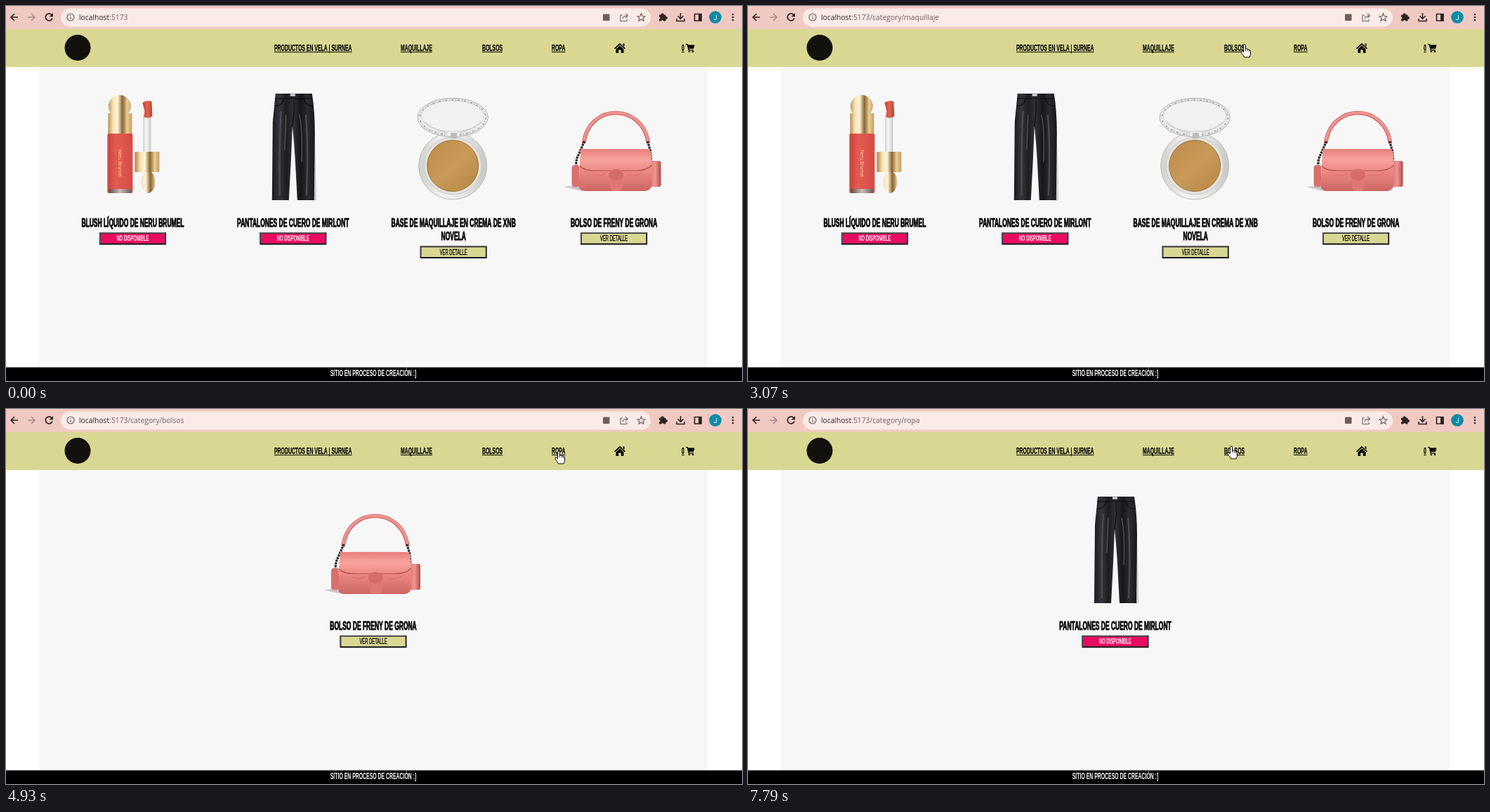
Recreate the animation shown at these times as an HTML page with a canvas. Size 1048x535 px, loop 8000 ms.

```html
<!DOCTYPE html>
<html lang="es">
<head>
<meta charset="utf-8">
<title>Tienda</title>
<style>
html, body { margin: 0; width: 100%; height: 100%; overflow: hidden; background: #fff; }
canvas { display: block; }
</style>
</head>
<body>
<canvas id="stage" width="1048" height="535"></canvas>
<script>
const ctx = document.getElementById('stage').getContext('2d');
const LOOP = 8000;
const CONDENSED = 0.53;
const OLIVE = '#d9d892', PINK = '#e90b60';
const HEADLINE = '"Liberation Sans", Arial, sans-serif';

// Drawing helpers
function rect(x, y, w, h, fill, r = 0) {
  ctx.fillStyle = fill;
  ctx.beginPath();
  ctx.roundRect(x, y, w, h, r);
  ctx.fill();
}

function oval(x, y, rx, ry, fill, stroke, width = 1) {
  ctx.beginPath();
  ctx.ellipse(x, y, rx, ry, 0, 0, Math.PI * 2);
  if (fill) { ctx.fillStyle = fill; ctx.fill(); }
  if (stroke) { ctx.strokeStyle = stroke; ctx.lineWidth = width; ctx.stroke(); }
}

function fillPath(d, fill) {
  ctx.fillStyle = fill;
  ctx.fill(new Path2D(d));
}

function line(d, stroke, width = 1) {
  ctx.strokeStyle = stroke;
  ctx.lineWidth = width;
  ctx.stroke(new Path2D(d));
}

function at(x, y, draw) {
  ctx.save();
  ctx.translate(x, y);
  draw();
  ctx.restore();
}

function gradient(x0, y0, x1, y1, ...colors) {
  const g = ctx.createLinearGradient(x0, y0, x1, y1);
  colors.forEach((c, i) => g.addColorStop(i / (colors.length - 1), c));
  return g;
}

function headline(text, x, y, size, { color = '#000', weight = 'bold', align = 'center', heavy = 0 } = {}) {
  at(x, y, () => {
    ctx.scale(CONDENSED, 1);
    ctx.font = `${weight} ${size}px ${HEADLINE}`;
    ctx.textAlign = align;
    ctx.fillStyle = ctx.strokeStyle = color;
    ctx.fillText(text, 0, 0);
    if (heavy) { ctx.lineWidth = heavy; ctx.strokeText(text, 0, 0); }
  });
}

// Products, drawn around x = 0
function blush() {
  const gold = x => gradient(x - 17, 0, x + 17, 0, '#b98f4e', '#f6e3b4', '#fdf4d8', '#8a6431', '#e9cf96', '#c39d5c');
  oval(-18.5, 143, 16, 16, gold(-18));
  rect(-35, 153, 34, 30, gold(-18), 1);
  rect(-36, 182, 36, 85, gradient(-36, 0, 0, 0, '#c9443f', '#e35a50', '#dd544c', '#d34c46'), 2);
  rect(-34, 261, 32, 6, gradient(-34, 0, -2, 0, '#5b4a47', '#c9bdb9', '#6c5a57'), 2);
  at(-20.5, 205, () => {
    ctx.rotate(Math.PI / 2);
    ctx.font = '7px Roboto, sans-serif';
    ctx.textAlign = 'left';
    ctx.fillStyle = '#f3cf9d';
    ctx.fillText('Neru Brumel', 0, 0);
  });
  rect(15, 155, 11, 54, gradient(15, 0, 26, 0, '#c9c9c9', '#f8f8f8', '#e6e6e6', '#c4c4c4'));
  fillPath('M14 138Q19 134 27 136L28 157Q22 162 16 158L17 150Z', gradient(14, 0, 28, 0, '#c8412f', '#e26551', '#b9402f'));
  oval(22, 251, 10, 16, gold(22));
  rect(3, 208, 35, 29, gold(21), 1);
}

function trousers() {
  fillPath('M26 125Q32 165 33 277L29 278Z', '#c9c9c9');
  fillPath('M-25 125H27Q31 150 31 180L30 277H6L3 220Q1 188-1 172L-3 220L-6 277H-30L-29 165Z',
    gradient(-30, 0, 31, 0, '#1c1c20', '#34343a', '#1d1d21', '#303036', '#17171a', '#2b2b30', '#18181b'));
  rect(-4, 125.5, 7, 3, '#ddd');
  line('M-26 132H27M1 130Q3 150-1 172M-26 142Q-16 144-13 132M28 142Q18 144 15 132', '#08080a', 0.9);
  line('M-17 150Q-20 190-19 270M18 155Q22 200 19 270', '#4c4c53', 2.2);
  line('M-10 155L-12 205M9 155Q14 180 12 222', '#5a5a60', 1.2);
}

function compact() {
  rect(-12, 179, 24, 12, '#d5d5d3', 3);
  oval(-1, 228, 48.5, 48, gradient(-49, 0, 48, 0, '#cfcfcd', '#f2f2f0', '#e6e6e4', '#c6c6c4'), '#bdbdbb');
  oval(-1, 228, 41, 41, '#e4e2de', '#c9c7c3');
  oval(-1, 228, 36.5, 36.5, gradient(-30, 195, 30, 260, '#bd8d49', '#c99a58', '#b98845'), '#9a7138');
  oval(-1, 159, 50, 27.5, gradient(0, 131, 0, 187, '#e9e9e8', '#f5f5f4', '#e2e2e1'), '#aaa');
  oval(-1, 157, 45, 22, '#f1f1f0', '#d0d0ce');
  ctx.setLineDash([3, 3, 1, 2]);
  oval(-1, 159, 47, 25, null, '#aaa', 2);
  ctx.setLineDash([]);
  line('M-42 165Q-1 198 40 165', '#cfcfcd', 1.5);
  rect(-9, 180, 18, 6, '#eee', 2);
  rect(-4, 181, 9, 8, '#bbb', 1);
}

function bag() {
  fillPath('M-71 258Q-40 253 0 262L45 264H-45Z', '#c9c6c4');
  line('M-43 196C-36 138 41 138 49 196', '#c96663', 5.5);
  line('M-43 195C-36 138 41 138 49 195', '#f39390', 3.4);
  ctx.setLineDash([3, 1]);
  line('M-42 193L-53 218L-54 227M48 193L52 207L53 222', '#222', 3.2);
  ctx.setLineDash([]);
  rect(-60, 227, 11, 31, '#d9706c', 4);
  rect(51, 221, 16, 37, gradient(51, 0, 67, 0, '#df7774', '#f09490', '#a94d4b'), 3);
  fillPath('M-47 207Q-48 203-42 204H46Q53 204 53 212L54 255Q53 263 45 264H-40Q-50 264-50 256Z',
    gradient(0, 204, 0, 264, '#f2928e', '#ee8a86', '#cc6663'));
  fillPath('M-47 207Q-48 203-42 204H46Q53 204 53 212L54 226Q47 234 30 234H-26Q-44 234-49 227Z',
    gradient(0, 204, 0, 235, '#e77f7c', '#f8a39d', '#ed8985'));
  line('M-49 228Q-43 235-26 235H30Q47 235 54 227', '#b45250', 1.2);
  line('M-30 240Q-20 244-12 239M17 241Q28 244 40 239', '#d4716d', 1.2);
  rect(-5, 238, 17, 26, '#df7875', 5);
  oval(3, 241, 10.5, 8.5, '#d66d6a');
}

const catalog = {
  blush: { draw: blush, title: ['BLUSH LÍQUIDO DE NERU BRUMEL'], sold: true },
  trousers: { draw: trousers, title: ['PANTALONES DE CUERO DE MIRLONT'], sold: true },
  compact: { draw: compact, title: ['BASE DE MAQUILLAJE EN CREMA DE XNB', 'NOVELA'] },
  bag: { draw: bag, title: ['BOLSO DE FRENY DE GRONA'] }
};

function card({ draw, title, sold }, center) {
  at(center, 0, () => {
    draw();
    title.forEach((row, i) => headline(row, 0, 315 + i * 19, 16, { heavy: 0.9 }));
    const top = 323 + (title.length - 1) * 19.5;
    rect(-47.5, top, 95, 17.5, '#000');
    rect(-47.5, top, 94, 16, '#4c4c4c');
    rect(-45.5, top + 2, 91, 13.5, sold ? PINK : OLIVE);
    headline(sold ? 'NO DISPONIBLE' : 'VER DETALLE', 0, top + 12.2, 11,
      sold ? { color: '#fff' } : { weight: 'normal', heavy: 0.3 });
  });
}

// Browser bar
function browser(path) {
  rect(0, 0, 1048, 33, '#f0c9c2');
  rect(78, 3.5, 840, 26, '#fbebe7', 13);
  const ink = '#2b2322', soft = '#6b5f5d';
  line('M17 16H7.5M12 11L7 16L12 21', ink, 1.6);
  line('M31 16H40.5M36 11L41 16L36 21', '#a38f8b', 1.6);
  line('M65.5 13.2A5 5 0 1 0 66 17.5', ink, 1.7);
  fillPath('M67 10V15.3H61.7Z', ink);
  oval(92, 16, 5, 5, null, soft, 1.2);
  rect(91.4, 15.2, 1.2, 3.8, soft);
  rect(91.4, 13, 1.2, 1.3, soft);

  ctx.font = '10.3px "Open Sans", "Noto Sans", sans-serif';
  ctx.textAlign = 'left';
  ctx.fillStyle = ink;
  ctx.fillText('localhost', 104, 20);
  const hostWidth = ctx.measureText('localhost').width;
  ctx.fillStyle = soft;
  ctx.fillText(':5173' + path, 104 + hostWidth, 20);

  rect(850, 11.5, 9.5, 9.5, soft, 1);
  line('M878 13H875V21.5H884V19M878 18Q879 14 885 14M882 10.8L885.5 14L882 17.2', soft, 1.1);
  line('M904.5 10.8L906 14.5L910 14.8L907 17.4L908 21.3L904.5 19.2L901 21.3L902 17.4L899 14.8L903 14.5Z', soft, 1.2);
  rect(930, 12.5, 9.5, 9, ink, 1);
  oval(934.7, 12.3, 2, 2, ink);
  oval(940, 17, 2, 2, ink);
  oval(930, 17, 1.6, 1.6, '#f0c9c2');
  oval(934.7, 21.6, 1.6, 1.6, '#f0c9c2');
  line('M960.5 10V18M956.5 14.3L960.5 18.3L964.5 14.3M955 18V21.5H966V18', ink, 1.6);
  line('M980.5 11.5H990V21H980.5Z', ink, 1.6);
  rect(986, 11, 4.5, 10.5, ink);
  oval(1010, 16, 8.8, 8.8, '#0a8ba8');
  ctx.font = '9.5px Roboto, sans-serif';
  ctx.textAlign = 'center';
  ctx.fillStyle = '#fff';
  ctx.fillText('J', 1010, 19.5);
  for (const y of [12, 16, 20]) oval(1035, y, 1.3, 1.3, ink);
}

// Shop header and footer
const links = [
  ['PRODUCTOS EN VELA | SURNEA', 382, 492],
  ['MAQUILLAJE', 562, 608],
  ['BOLSOS', 678, 707],
  ['ROPA', 777, 797],
  ['0', 962, 967]
];

function shopFrame() {
  rect(0, 33, 1048, 54, OLIVE);
  oval(102, 59.5, 18.5, 18.5, '#12110d');
  for (const [label, x] of links) {
    headline(label, x, 64, 13, { align: 'left', heavy: 0.25 });
    rect(x, 65.2, ctx.measureText(label).width * 0 + labelWidth(label), 1, '#000');
  }
  fillPath('M874 53L882 60.3L881 61.5L874 55.2L867 61.5L866 60.3ZM878.5 53.5H880.5V58L878.5 56ZM874 56.5L879.5 61.5V67H875.8V62.5H872.2V67H868.5V61.5Z', '#000');
  fillPath('M968 54H970.8L971.3 55.5H980.5L979 61H972.5L972.8 62.2H978.8V63.5H971.6L969.8 55.3H968Z', '#000');
  oval(973, 65, 1.3, 1.3, '#000');
  oval(978, 65, 1.3, 1.3, '#000');
  rect(47, 87, 952, 428.5, '#f7f7f7');
  rect(0, 515.5, 1048, 19.5, '#000');
  headline('SITIO EN PROCESO DE CREACIÓN :]', 523, 527.5, 13, { color: '#fff' });
}

function labelWidth(label) {
  ctx.font = `bold 13px ${HEADLINE}`;
  return ctx.measureText(label).width * CONDENSED;
}

// Pointer: time, x, y of its tip
const route = [
  [980, 916, 428], [1430, 511, 134], [1630, 511, 134], [1850, 470, 92],
  [2200, 621, 60], [2400, 583, 58], [2470, 582, 57], [2700, 582, 57],
  [3070, 707, 55], [3770, 707, 55], [3900, 707, 56], [4580, 707, 56],
  [4750, 746, 76], [4930, 787, 60], [5860, 787, 60], [6310, 674, 83],
  [6480, 541, 176], [6660, 690, 62], [6900, 702, 43], [7120, 689, 54],
  [7780, 689, 54], [7790, 688, 53]
];

function pointerAt(t) {
  const next = route.findIndex(p => p[0] > t);
  if (next < 0) return route[route.length - 1].slice(1);
  const [t0, x0, y0] = route[next - 1], [t1, x1, y1] = route[next];
  const u = (t - t0) / (t1 - t0), k = u * u * (3 - 2 * u);
  return [x0 + (x1 - x0) * k, y0 + (y1 - y0) * k];
}

const arrow = 'M.5.5V12.5L3.3 10L5.3 14.6L7.3 13.7L5.3 9.2H9Z';
const hand = 'M-1.5 11V1.5Q-1.5 0 0 0T1.5 1.5V6Q3.8 5 4.3 7Q6 6.2 6.6 8Q8.5 7.4 8.5 9.5V13Q8.5 16 7 18H-.5Q-1.5 15.5-3.8 13Q-6 10-4.5 9Q-3 8.5-1.5 11Z';

function pointer(t) {
  if (t < route[0][0]) return;
  const [x, y] = pointerAt(t);
  const overLink = y > 51 && y < 69 && links.some(([, a, b]) => x >= a && x <= b);
  at(Math.round(x), Math.round(y), () => {
    const shape = overLink ? hand : arrow;
    fillPath(shape, '#fff');
    line(shape, '#000', 1);
    if (overLink) line('M1.5 6V9M4.3 7.5V9.5M6.6 8.5V10', '#000', 0.9);
  });
}

// Latest entry whose start time has passed
const current = (steps, t) => steps.filter(s => s[0] <= t).pop()[1];

const paths = [[0, ''], [2700, '/category/maquillaje'], [3770, '/category/bolsos'], [5180, '/category/ropa']];
const shelves = [
  [0, ['blush', 'trousers', 'compact', 'bag']],
  [3200, ['blush', 'compact']],
  [4120, ['bag']],
  [5530, ['trousers']]
];

function render(t) {
  rect(0, 0, 1048, 535, '#fff');
  browser(current(paths, t));
  shopFrame();
  const shelf = current(shelves, t);
  shelf.forEach((name, i) => card(catalog[name], 523 + (i - (shelf.length - 1) / 2) * 228.4));
  pointer(t);
}

const start = performance.now();
function tick() {
  render((performance.now() - start) % LOOP);
  requestAnimationFrame(tick);
}
tick();
</script>
</body>
</html>
```
